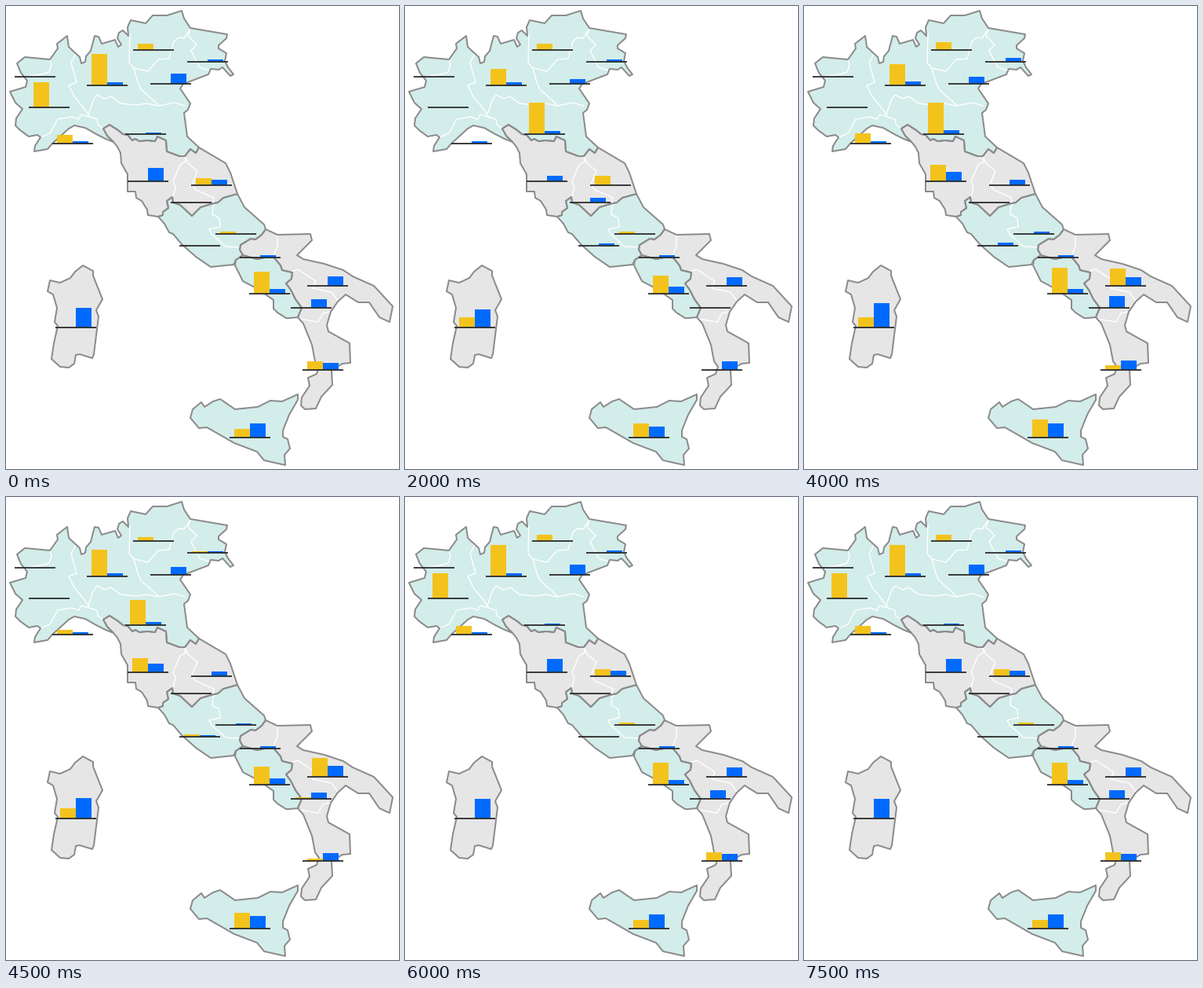
Write a matplotlib script that moves like this. It is 501 px wide and 589 px high and loops after 8 s.

```python
import numpy as np
import matplotlib.pyplot as plt
from matplotlib.animation import FuncAnimation
from matplotlib.patches import Polygon, Rectangle

W, H, DPI = 501, 589, 64
FRAMES, STEP = 16, 500
PX = 72 / DPI
TEAL, GREY, EDGE = "#d3edea", "#e6e6e6", "#8b8b8b"
YELLOW, BLUE, INK = "#f3c31c", "#006aff", "#2b2b2b"
MARKS = [0, 4, 6, 8, 10, 12]  # rest, four swings, rest until the loop ends

fig = plt.figure(figsize=(W / DPI, H / DPI), dpi=DPI, facecolor="white")
ax = fig.add_axes([0, 0, 1, 1])
ax.set(xlim=(0, W), ylim=(H, 0))
ax.axis("off")


def pts(*xy):
    return np.reshape(xy, (-1, 2))


def land(color, *parts):
    shape = np.vstack(parts)
    ax.add_patch(Polygon(shape, fc=color, ec="none", zorder=1))
    ax.add_patch(Polygon(shape, fc="none", ec=EDGE, lw=2 * PX,
                         joinstyle="round", zorder=3))


def inner(*xy):
    ax.plot(*pts(*xy).T, color="white", lw=1.4 * PX, zorder=2,
            solid_joinstyle="round")


# Borders shared by neighbouring areas
north_centre = pts(
    246, 180, 242, 187, 235, 182, 228, 191, 221, 191, 205, 185, 204, 171,
    193, 166, 190, 172, 180, 171, 170, 172, 165, 169, 161, 171, 155, 164,
    149, 163, 143, 158, 132, 151, 124, 156, 129, 165, 137, 173)
centre_mid = pts(
    295, 239, 277, 244, 270, 250, 261, 252, 248, 256, 237, 267, 222, 253,
    213, 250, 212, 243, 205, 248, 207, 257, 200, 262, 200, 266, 194, 268)
mid_south = pts(331, 284, 326, 291, 318, 297, 312, 296, 299, 304, 298, 310,
                302, 317)
west_south = pts(302, 317, 320, 322, 340, 318, 350, 330, 352, 336, 365, 339,
                 364, 347, 357, 353, 363, 361, 369, 373, 377, 384, 372, 396)

# North
land(TEAL, pts(
    224, 6, 227, 16, 235, 28, 282, 36, 281, 41, 271, 50, 271, 54, 281, 60,
    279, 70, 283, 78, 290, 87, 286, 89, 276, 78, 271, 81, 261, 80, 258, 87,
    237, 95, 226, 99, 222, 105, 235, 124, 232, 132, 227, 136, 231, 166),
    north_centre, pts(
    127, 169, 115, 163, 101, 155, 87, 152, 80, 156, 59, 175, 53, 182,
    36, 185, 37, 178, 44, 167, 40, 164, 29, 166, 18, 158, 12, 152, 13, 143,
    21, 131, 12, 123, 5, 109, 25, 103, 27, 95, 19, 85, 14, 73, 24, 65,
    56, 68, 66, 54, 65, 48, 78, 38, 80, 52, 94, 65, 96, 73, 101, 71,
    102, 64, 108, 57, 113, 38, 118, 39, 122, 48, 139, 43, 143, 52, 147, 49,
    142, 41, 144, 34, 149, 31, 156, 38, 155, 27, 159, 18, 178, 22, 187, 12,
    205, 12))
# Centre
land(GREY, north_centre[::-1], pts(263, 190, 280, 200, 286, 212), centre_mid,
     pts(181, 266, 180, 259, 173, 248, 166, 244, 165, 236, 155, 236, 155, 214,
         147, 200, 146, 187, 142, 179))
land(TEAL, centre_mid[::-1], pts(304, 256, 329, 278), mid_south, pts(
    293, 323, 290, 329, 261, 332, 242, 319, 224, 303, 213, 290, 208, 288,
    202, 277))
# South
land(TEAL, west_south, pts(
    361, 397, 357, 397, 346, 390, 341, 385, 341, 374, 321, 360, 302, 350,
    292, 330, 293, 323))
land(GREY, pts(
    346, 291, 388, 290, 390, 298, 371, 317, 379, 322, 406, 328, 430, 336,
    442, 344, 469, 356, 493, 382, 489, 402, 476, 396, 463, 377, 449, 377,
    433, 367, 423, 376, 414, 389, 409, 406, 411, 414, 438, 429, 439, 454,
    429, 455, 415, 463, 416, 482, 402, 497, 395, 512, 381, 513, 376, 508,
    377, 498, 387, 483, 385, 473, 396, 468, 399, 459, 394, 452, 390, 431,
    379, 404), west_south[::-1], mid_south[::-1])
# Islands
land(GREY, pts(
    98, 330, 111, 337, 111, 343, 123, 373, 115, 387, 118, 395, 112, 443,
    110, 448, 94, 443, 89, 444, 87, 455, 80, 460, 69, 459, 58, 449, 61, 429,
    66, 407, 62, 402, 65, 384, 60, 367, 53, 363, 56, 349, 69, 352, 82, 346,
    88, 338))
land(TEAL, pts(
    372, 494, 372, 501, 361, 520, 353, 540, 353, 548, 359, 551, 362, 563,
    355, 571, 356, 584, 329, 578, 320, 567, 291, 556, 256, 536, 246, 537,
    235, 524, 238, 513, 249, 504, 253, 510, 264, 503, 273, 500, 292, 513,
    321, 510, 337, 502, 352, 503))

# Inner borders
inner(56, 68, 58, 75, 55, 84, 45, 87, 25, 90)
inner(89, 61, 83, 72, 90, 97, 80, 101, 87, 115, 100, 131, 106, 140)
inner(44, 167, 56, 162, 66, 144, 84, 141, 93, 144, 96, 138, 116, 144,
      117, 151, 124, 156)
inner(105, 138, 111, 120, 116, 113, 126, 118, 134, 115, 146, 124, 166, 126,
      180, 124, 194, 127, 215, 123, 228, 127)
inner(158, 36, 157, 72, 163, 79, 168, 97, 172, 106, 190, 122, 194, 126)
inner(163, 79, 181, 83, 194, 68, 208, 67, 214, 45, 220, 40, 227, 41, 235, 29,
      232, 38, 243, 49, 236, 57, 247, 78, 259, 82)
inner(228, 191, 229, 198, 222, 202, 213, 223, 216, 230, 213, 242)
inner(228, 191, 232, 200, 244, 210, 237, 227, 242, 234, 265, 244, 264, 252)
inner(274, 246, 264, 254, 263, 265, 272, 270, 273, 281, 259, 284, 262, 290,
      280, 306, 299, 307)
inner(346, 291, 346, 305, 341, 318)
inner(363, 338, 372, 335, 395, 350, 391, 359, 415, 364, 423, 375)
inner(374, 398, 398, 402, 404, 391, 412, 389)

bars = []


def heights(rest, *swings):
    """Whole-pixel heights easing from rest through the swings and back."""
    keys = (rest, *(swings or [rest] * 4), rest)
    return np.round(np.interp(np.arange(FRAMES), MARKS, keys))


def chart(x, y, yellow=(0,), blue=(0,)):
    for left, color, keys in ((x - 20, YELLOW, yellow), (x, BLUE, blue)):
        bar = Rectangle((left, y), 20, 0, fc=color, ec="none", zorder=4)
        ax.add_patch(bar)
        bars.append((bar, heights(*keys)))
    ax.plot([x - 26, x + 26], [y, y], color=INK, lw=1.8 * PX, zorder=5,
            solid_capstyle="butt", snap=False)


chart(37, 90)
chart(55, 129, yellow=(32, 0, 22, 0, 0))
chart(129, 101, yellow=(40, 21, 1, 27, 40), blue=(4, 4, 0, 5, 4))
chart(188, 56, yellow=(8, 8, 5, 10, 0))
chart(257, 71, yellow=(0, 0, 0, 0, 5), blue=(3, 3, 0, 5, 0))
chart(210, 99, yellow=(0, 0, 40, 0, 0), blue=(13, 6, 12, 9, 10))
chart(178, 163, yellow=(0, 40, 4, 40, 25), blue=(2, 4, 9, 5, 2))
chart(85, 175, yellow=(11, 0, 0, 13, 0), blue=(3,))
chart(181, 223, yellow=(0, 0, 3, 21, 16), blue=(17, 7, 12, 12, 10))
chart(262, 228, yellow=(9, 12, 12, 0, 0), blue=(7, 0, 2, 7, 5))
chart(236, 250, blue=(0, 6, 0, 0, 0))
chart(247, 305, yellow=(1, 0, 1, 0, 6), blue=(0, 3, 0, 4, 0))
chart(293, 290, yellow=(3, 3, 3, 0, 0), blue=(0, 0, 0, 3, 0))
chart(324, 320, blue=(3,))
chart(336, 366, yellow=(28, 23, 14, 33, 13), blue=(6, 9, 9, 6, 10))
chart(410, 356, yellow=(0, 0, 27, 22, 26), blue=(12, 11, 13, 11, 18))
chart(389, 384, yellow=(0, 0, 0, 0, 3), blue=(11, 0, 6, 15, 0))
chart(404, 463, yellow=(11, 0, 1, 6, 0), blue=(9, 11, 7, 12, 9))
chart(311, 549, yellow=(11, 18, 12, 23, 16), blue=(18, 14, 14, 18, 15))
chart(89, 409, yellow=(0, 13, 0, 13, 13), blue=(25, 23, 17, 31, 21))


def update(i):
    for bar, tall in bars:
        bar.set_height(-tall[i])
    return [bar for bar, _ in bars]


anim = FuncAnimation(fig, update, frames=FRAMES, interval=STEP, repeat=True,
                     repeat_delay=0, blit=False)
plt.show()
```
